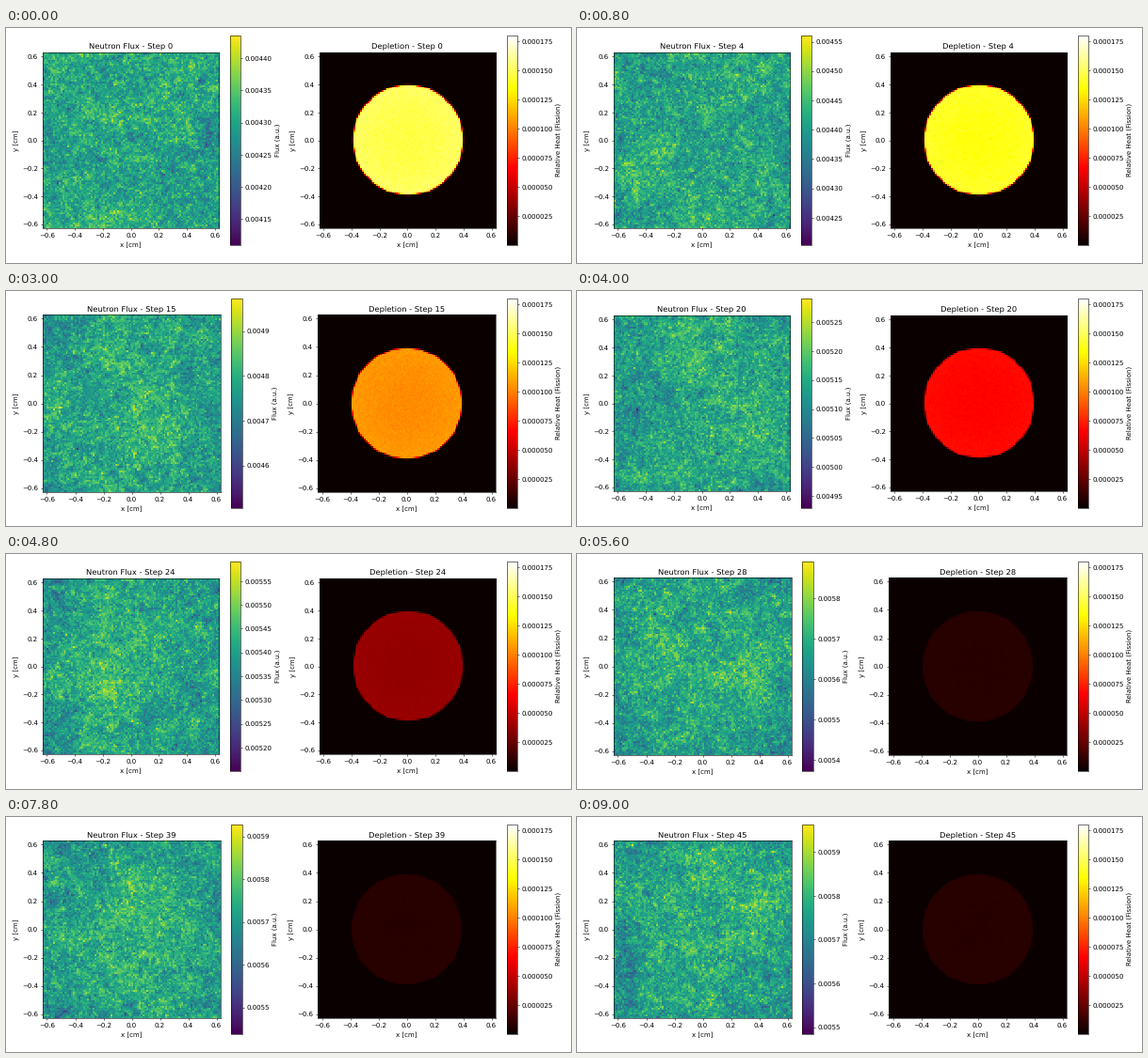
Recreate the animation shown at these times as a matplotlib script. Size 600 px wide and 250 px high, loop 9.2 s.

```python
import numpy as np
import matplotlib.pyplot as plt
from matplotlib.animation import FuncAnimation
from matplotlib.ticker import MultipleLocator

W, H, DPI = 600, 250, 50
STEPS, INTERVAL = 46, 200
CELLS, HALF, RADIUS = 100, 0.63, 0.392
HEAT_MIN, HEAT_MAX = 2e-7, 1.8e-4

# Key points: step, lowest and highest flux (1e-3), fuel heat (share of maximum)
STEP, LOW, HIGH, HEAT = np.transpose([
    (0, 4.11, 4.435, 0.83),
    (8, 4.298, 4.685, 0.72),
    (15, 4.506, 4.972, 0.585),
    (20, 4.93, 5.29, 0.375),
    (28, 5.373, 5.891, 0.045),
    (33, 5.393, 5.892, 0.045),
    (45, 5.485, 5.962, 0.045),
])

cell = 2 * HALF / CELLS
axis = (np.arange(CELLS) + 0.5) * cell - HALF
R = np.hypot(*np.meshgrid(axis, axis))
FUEL = np.clip((RADIUS - R) / cell + 0.5, 0, 1)
freq = np.fft.fftfreq(CELLS)
FREQ2 = freq[:, None] ** 2 + freq[None, :] ** 2


def smooth_noise(rng, width):
    """Unit-variance noise blurred over the given number of cells."""
    raw = rng.standard_normal((CELLS, CELLS))
    kernel = np.exp(-2 * (np.pi * width) ** 2 * FREQ2)
    out = np.fft.ifft2(np.fft.fft2(raw) * kernel).real
    return (out - out.mean()) / out.std()


def flux_field(step):
    """Relative flux: grain, soft patches and a dome that grows with time."""
    rng = np.random.default_rng(100 + step)
    noise = (0.75 * smooth_noise(rng, 0) + 0.55 * smooth_noise(rng, 0.8)
             + 0.3 * smooth_noise(rng, 3) + 0.25 * smooth_noise(rng, 10))
    dome = 0.11 * min(step / 25, 1) * (0.4 - 0.6 * (R / HALF) ** 2)
    field = 0.095 * noise + dome
    return np.clip(field - field.mean() + 0.59, 0, 1)


def heat_field(step):
    rng = np.random.default_rng(500 + step)
    rim = 0.98 + 0.04 * (R / RADIUS) ** 2
    grain = 1 + 0.012 * smooth_noise(rng, 0)
    return np.interp(step, STEP, HEAT) * HEAT_MAX * rim * grain * FUEL


def place(ax, left, right, top, bottom):
    """Set an axes box given in pixels from the top left."""
    ax.set_position([left / W, 1 - bottom / H, (right - left) / W, (bottom - top) / H])


def make_panel(cmap, label, ticks=None):
    ax = fig.add_axes([0.1, 0.1, 0.3, 0.8])
    bar_ax = fig.add_axes([0.5, 0.1, 0.02, 0.8])
    image = ax.imshow(np.zeros((CELLS, CELLS)), cmap=cmap, origin="lower",
                      extent=(-HALF, HALF, -HALF, HALF), aspect="auto",
                      interpolation="nearest", vmin=HEAT_MIN, vmax=HEAT_MAX)
    ax.set_xlabel("x [cm]")
    ax.set_ylabel("y [cm]")
    fig.colorbar(image, cax=bar_ax, label=label, ticks=ticks)
    return ax, bar_ax, image


plt.rcParams.update({"font.family": "DejaVu Sans", "text.hinting": "none"})
fig = plt.figure(figsize=(W / DPI, H / DPI), dpi=DPI, facecolor="white")
flux_ax, flux_bar, flux_im = make_panel("viridis", "Flux (a.u.)")
heat_ax, heat_bar, heat_im = make_panel("hot", "Relative Heat (Fission)",
                                        MultipleLocator(2.5e-5))


def update(step):
    low = np.interp(step, STEP, LOW) * 1e-3
    high = np.interp(step, STEP, HIGH) * 1e-3
    flux_im.set_data(low + (high - low) * flux_field(step))
    flux_im.set_clim(low, high)
    heat_im.set_data(heat_field(step))
    flux_ax.set_title(f"Neutron Flux - Step {step}")
    heat_ax.set_title(f"Depletion - Step {step}")

    # Shorter tick labels leave room for slightly larger maps
    size = 189 if high - low > 4.5e-4 else 187.4
    top, bottom = 119.5 - size / 2, 119.5 + size / 2
    place(flux_ax, 39, 39 + size, top, bottom)
    place(flux_bar, 50.4 + size, 61.5 + size, 8.3, 230.5)
    place(heat_ax, 520 - size, 520, top, bottom)
    place(heat_bar, 531.7, 542.8, 8.3, 230.5)
    return flux_im, heat_im


anim = FuncAnimation(fig, update, frames=STEPS, interval=INTERVAL,
                     init_func=lambda: update(0), repeat=True, repeat_delay=0)
plt.show()
```
